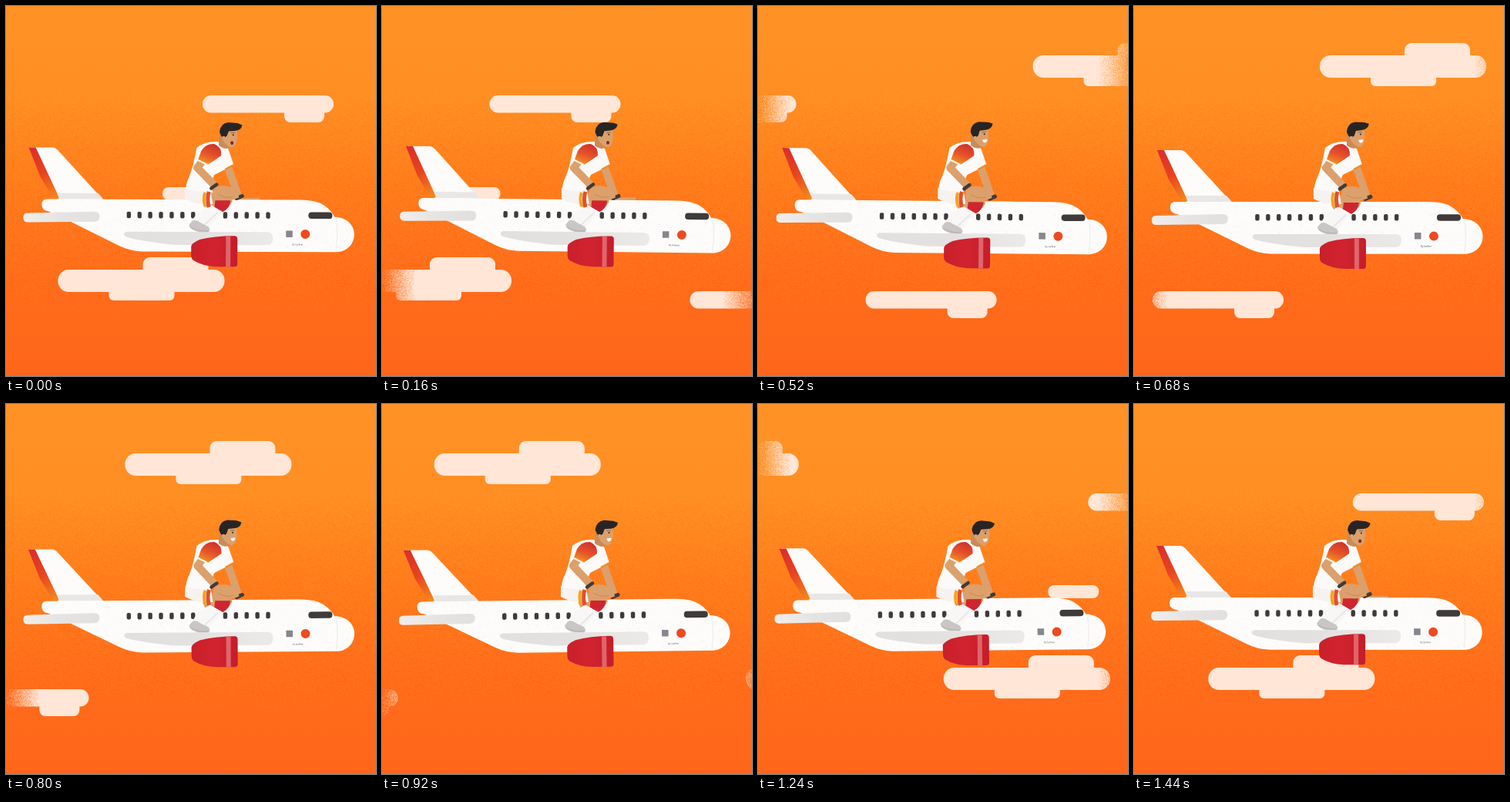
An HTML page with a canvas that plays this animation: 480x480 px, repeating every 1.48 s.

```html
<!DOCTYPE html>
<html lang="en">
<head>
<meta charset="utf-8">
<title>Plane ride</title>
<style>
html, body { margin: 0; width: 100%; height: 100%; overflow: hidden; background: #ff7a1c; }
canvas { display: block; width: 480px; height: 480px; }
</style>
</head>
<body>
<canvas id="stage" width="480" height="480"></canvas>
<script>
const SIZE = 480, LOOP = 1480, STEP = 40;
const CLOUD_SPEED = 0.722, CLOUD_SPAN = CLOUD_SPEED * LOOP;
const CREAM = '#ffe6d6', SKIN = '#dba06c', SKIN_DARK = '#c98b58', DARK = '#403b3b';
const ctx = document.getElementById('stage').getContext('2d');

let seed = 7;
function random() {
  seed = (seed * 1664525 + 1013904223) % 4294967296;
  return seed / 4294967296;
}
const clamp = v => Math.max(0, Math.min(1, v));

function makeLayer(paint) {
  const canvas = document.createElement('canvas');
  canvas.width = canvas.height = SIZE;
  const g = canvas.getContext('2d');
  if (paint) paint(g);
  return canvas;
}

function eachPixel(g, change) {
  const image = g.getImageData(0, 0, SIZE, SIZE);
  for (let y = 0, i = 0; y < SIZE; y++) {
    for (let x = 0; x < SIZE; x++, i += 4) change(image.data, i, x, y);
  }
  g.putImageData(image, 0, 0);
}

function gradient(g, x0, y0, x1, y1, ...stops) {
  const fill = g.createLinearGradient(x0, y0, x1, y1);
  stops.forEach((color, i) => fill.addColorStop(i / (stops.length - 1), color));
  return fill;
}

const sky = makeLayer(g => {
  g.fillStyle = gradient(g, 0, 0, 0, SIZE, '#ff9226', '#ff8e23', '#ff7b1b', '#ff6c1a', '#ff661b');
  g.fillRect(0, 0, SIZE, SIZE);
  eachPixel(g, (data, i, x, y) => {
    const grain = (random() - 0.5) * 14 * clamp((y - 90) / 50) * clamp((420 - y) / 60);
    data[i + 1] += grain;
    data[i + 2] += grain / 2;
  });
});

// Clouds dissolve into grain near both sides of the stage.
const edgeMask = makeLayer(g => {
  eachPixel(g, (data, i, x) => {
    const fade = Math.min(x / 42, (490 - x) / 48);
    data[i + 3] = 255 * clamp(fade + (fade < 1 ? (random() - 0.5) * 0.45 : 0));
  });
});

const cloudLayer = makeLayer();
const cloudCtx = cloudLayer.getContext('2d');

// Each part: x, y, width, height, radius
const BIG = [[0, 0, 216, 29, 14], [110, -16, 85, 25, 9], [66, 18, 85, 22, 6]];
const LONG = [[0, 0, 170, 22.5, 11], [106, 11, 52, 24, 8]];
const SMALL = [[0, 0, 66, 17, 8]];
const clouds = [
  [LONG, 255, 116], [LONG, 515, 370], [BIG, 732, 64], [BIG, 67.5, 342], [SMALL, 203, 235]
];

function drawClouds(time) {
  const g = cloudCtx;
  g.clearRect(0, 0, SIZE, SIZE);
  g.fillStyle = CREAM;
  for (const [parts, start, y] of clouds) {
    const left = start - CLOUD_SPEED * time;
    const x = ((left + 300) % CLOUD_SPAN + CLOUD_SPAN) % CLOUD_SPAN - 300;
    g.beginPath();
    for (const [dx, dy, w, h, r] of parts) g.roundRect(x + dx, y + dy, w, h, r);
    g.fill();
  }
  g.globalCompositeOperation = 'destination-in';
  g.drawImage(edgeMask, 0, 0);
  g.globalCompositeOperation = 'source-over';
  ctx.drawImage(cloudLayer, 0, 0);
}

function shape(path, fill) {
  ctx.fillStyle = fill;
  ctx.fill(typeof path === 'string' ? new Path2D(path) : path);
}
function stroke(path, color, width, cap = 'round') {
  ctx.strokeStyle = color;
  ctx.lineWidth = width;
  ctx.lineCap = cap;
  ctx.lineJoin = 'round';
  ctx.stroke(new Path2D(path));
}
function pill(x, y, w, h, r, fill) {
  ctx.beginPath();
  ctx.roundRect(x, y, w, h, r);
  ctx.fillStyle = fill;
  ctx.fill();
}
function dot(x, y, r, fill) {
  ctx.beginPath();
  ctx.arc(x, y, r, 0, 2 * Math.PI);
  ctx.fillStyle = fill;
  ctx.fill();
}

const fuselage = new Path2D('M53 251H380Q402 251 412 258Q421 264 426 273C441 273 451.5 283 451.5 295.5C451.5 309 441 318.5 428 318.5H176Q160 318 146 311L85 281L55 267Q46 266 46 258Q46 251 53 251Z');
const specks = Array.from({ length: 500 }, () => [46 + random() * 400, 251 + random() * 67]);

function drawPlane() {
  shape('M31 184H59Q64 184 68 189L126 252H68Z', '#fdfcfb');
  shape('M29 184H38L69 250H61L44 222Z', gradient(ctx, 30, 184, 66, 250, '#d92d2b', '#e8431f', '#f58a1c'));
  shape('M66 243H119L126 251H69Z', '#e9e7e6');
  shape(fuselage, '#fdfcfb');

  ctx.save();
  ctx.clip(fuselage);
  ctx.fillStyle = 'rgba(120,110,110,.1)';
  for (const [x, y] of specks) ctx.fillRect(x, y, 1, 1);
  ctx.restore();

  shape('M28 269L114 267Q121 267 121 273Q121 280 114 280L28 281Q22 281 22 275Q22 269 28 269Z',
    gradient(ctx, 22, 0, 121, 0, '#f0eeec', '#e6e4e3', '#e2e0df'));
  shape('M156 293H339Q346 293 346 301Q346 310 338 310H220Q178 306 156 300Q149 296 156 293Z',
    gradient(ctx, 152, 0, 346, 0, '#e1e0df', '#e3e2e1', '#ebeae9'));

  for (let i = 0; i < 14; i++) pill(156.3 + i * 13.9, 267, 5.4, 8.5, 2, DARK);
  pill(392, 267, 31, 8.5, 4, DARK);
  stroke('M428 275Q431 295 428 316', '#efedeb', 1.2);

  pill(363, 291, 8.5, 8.5, 0, '#85878c');
  dot(388, 295.5, 6, '#ed4a20');
  ctx.fillStyle = '#55565a';
  ctx.font = '3px Inter, sans-serif';
  ctx.textAlign = 'center';
  ctx.fillText('fly further', 378, 310);

  shape('M251 303Q270 298 296 298Q300 298 300 302V335Q300 338 296 338H272Q254 337 243 330Q240 328 240 323V312Q240 308 251 303Z',
    gradient(ctx, 240, 0, 300, 0, '#c9202b', '#d1232f', '#c41d2a'));
  shape('M285 298.5H291V338H285Z', '#df656a');
}

function drawLeg() {
  shape('M250 244L278 241Q294 243 293 254Q288 263 278 268L258 261Z', SKIN);
  shape('M271 252L291 252Q290 262 281 267L270 261Z', '#cf2530');
  shape('M264 257L281 267L262 288L240 280L248 268Z', '#f9f7f6');
  stroke('M274 268L258 283', '#e9e6e4', 2);
  shape('M241 279Q246 276 252 281L262 286Q266 291 262 293H249Q238 290 237 284Z', '#c9c6c5');
  stroke('M239 287Q247 292 262 292', '#b5b2b1', 1.2);
}

function drawTorso(handX, handY) {
  stroke(`M287 207L${301 + handX} ${247 + handY}`, SKIN, 10, 'butt');
  stroke(`M${299 + handX} ${250 + handY}L${306 + handX} ${247 + handY}`, DARK, 5);

  shape('M247 184Q258 175 274 176Q288 180 290 191L295 206L284 212L270 219Q263 232 265 251Q247 256 232 250Q232 230 238 220Q243 207 247 184Z', '#fcfaf9');
  stroke('M284 212L295 206', '#f28a22', 2, 'butt');
  shape('M232 236Q247 243 265 239L268 257Q247 259 232 250Z', '#f5f2f0');
  stroke('M258 242Q255 249 258 260', '#f6a31d', 4, 'butt');
  stroke('M263 241Q260 250 263 261', '#e0502a', 5, 'butt');

  stroke(`M256 199L248 210L${271 + handX} ${234 + handY}`, SKIN, 10, 'butt');
  shape('M253 188Q259 178 270 179Q280 183 279 194Q271 200 261 206L249 199Z',
    gradient(ctx, 266, 179, 256, 205, '#d2352b', '#e5532a', '#f6941f'));
  stroke('M249 200L261 206', '#fff4e8', 2, 'butt');

  ctx.save();
  ctx.translate(handX, handY);
  shape('M270 236Q280 232 290 235Q302 240 302 249Q291 254 279 252Q267 249 268 242Z', SKIN);
  stroke('M275 245Q285 251 294 248', SKIN_DARK, 1);
  stroke('M266 237L273 232', DARK, 4.5);
  ctx.restore();
}

function drawHead(angle, openMouth) {
  ctx.save();
  ctx.translate(280, 180);
  ctx.rotate(angle);
  ctx.translate(-280, -180);
  shape('M276 168L285 168L291 182Q286 188 276 181Z', SKIN_DARK);
  shape('M281 159L298 157Q300 166 299 173Q299 181 293 183Q285 182 280 172Z', SKIN);
  shape('M276 163Q277 152 287 150.5L299 151L305 153Q304 160 296 161L288 162L286 168L282 172Q277 168 276 163Z', '#282424');
  dot(282, 171, 2.3, SKIN);
  dot(294, 166.5, 1, '#282424');
  stroke('M291 164L296 163.5', '#8a5c3b', 0.8);
  if (openMouth) {
    ctx.beginPath();
    ctx.ellipse(293, 177, 2, 2.4, 0, 0, 2 * Math.PI);
    ctx.fillStyle = '#7b2923';
    ctx.fill();
  } else {
    shape('M291 174L297.5 173Q297 178.5 293 177.5Z', '#fff8f0');
  }
  ctx.restore();
}

function render(time) {
  const wave = peak => Math.cos(2 * Math.PI * (time - peak) / LOOP);
  const noseLift = 2.2 * wave(480), tailLift = 4.3 * wave(980);
  const dx = wave(420), dy = (noseLift + tailLift) / 2;
  const tilt = (noseLift - tailLift) / 422;
  const farLegY = 250.5 + 2.1 * (dy + 1.6);

  ctx.drawImage(sky, 0, 0);
  drawClouds(time);
  stroke(`M302 ${farLegY}H328`, SKIN, 3);

  ctx.save();
  ctx.translate(240.5 + dx, 291.7 + dy);
  ctx.rotate(tilt);
  ctx.translate(-240, -290);
  drawPlane();
  drawLeg();
  ctx.restore();

  ctx.save();
  ctx.translate(0.5 + dx, 0);
  drawTorso(0, 0.3 * dy);
  ctx.restore();
  drawHead(0.03 + 0.05 * wave(1240), time < 180 || time >= 1320);
}

function tick() {
  const now = performance.now() % LOOP;
  render(Math.floor(now / STEP) * STEP);
  requestAnimationFrame(tick);
}
tick();
</script>
</body>
</html>
```
